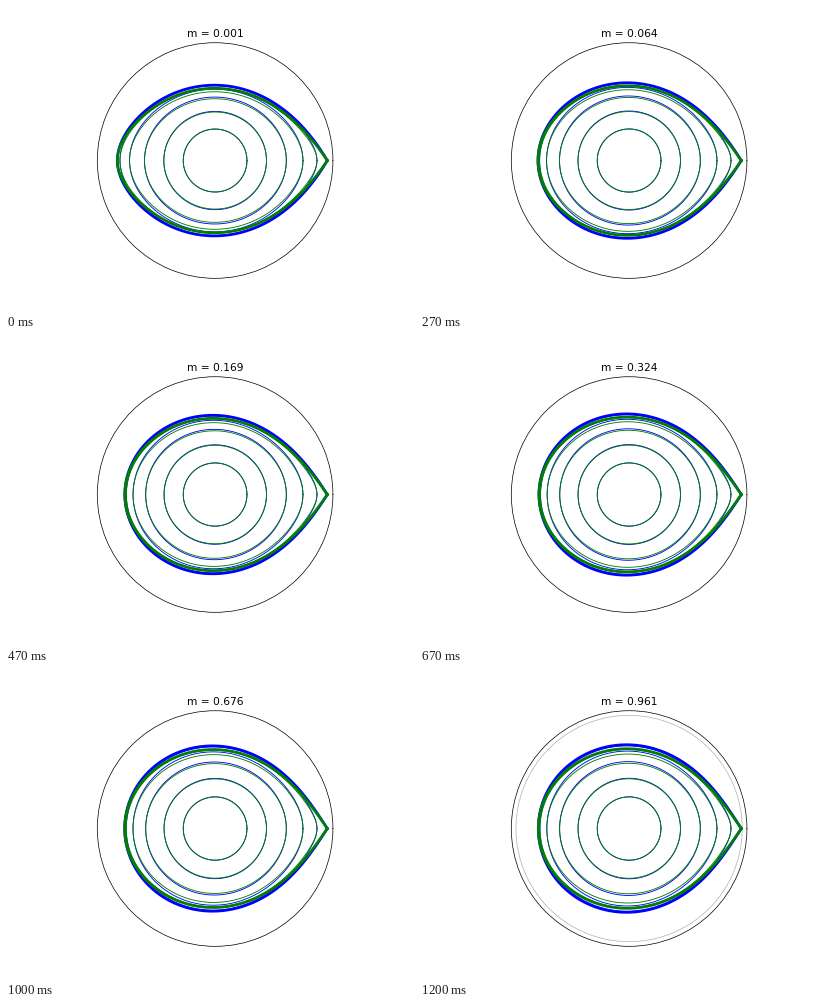
Recreate the animation shown at these times as a matplotlib script. Size 408 by 306 pixels, loop 1270 ms.

```python
import numpy as np
import matplotlib.pyplot as plt
from matplotlib.animation import FuncAnimation

DPI = 63.75
FRAMES, TICK = 127, 10
# Sub-stellar radius of each surface, in units of the L1 distance
LEVELS = np.array([0.284, 0.458, 0.635, 0.783, 0.908, 1.0])[:, None]
R_MAX = 1.05
THETA = np.linspace(0, 2 * np.pi, 481)


def bisect(below, lo, hi, steps=40):
    """Find where below() turns from true to false."""
    for _ in range(steps):
        mid = (lo + hi) / 2
        inside = below(mid)
        lo, hi = np.where(inside, mid, lo), np.where(inside, hi, mid)
    return (lo + hi) / 2


def l1_distance(q):
    def rising(r):
        return q / r**2 - 1 / (1 - r)**2 - (1 + q) * r + 1 > 0
    return float(bisect(rising, 0.0, 1.0))


def potential(r, theta, q, in_plane):
    """Roche potential around the star of mass q; its unit-mass companion is at x = 1."""
    x, side = r * np.cos(theta), r * np.sin(theta)
    spin = (x - 1 / (1 + q))**2 + (side**2 if in_plane else 0)
    return -q / r - 1 / np.sqrt((1 - x)**2 + side**2) - (1 + q) / 2 * spin


def surfaces(q, l1, in_plane):
    level = potential(LEVELS * l1, 0.0, q, True)

    def inside(r):
        return potential(r, THETA, q, in_plane) < level

    shape = (len(LEVELS), len(THETA))
    r = bisect(inside, np.zeros(shape), np.full(shape, l1))
    r[:, [0, -1]] = LEVELS * l1
    return r / l1


fig = plt.figure(figsize=(408 / DPI, 306 / DPI), dpi=DPI)
ax = fig.add_subplot(projection="polar")
ax.set_xticks([])
ax.set_yticks([])
ax.grid(False)
ax.set_ylim(0, R_MAX)

ring, = ax.plot(THETA, np.full_like(THETA, 2), color="#b0b0b0", lw=0.8)


def add_lines(color):
    widths = [1] * (len(LEVELS) - 1) + [3]
    return [ax.plot(THETA, THETA * 0, color=color, lw=w)[0] for w in widths]


equator = add_lines("blue")
meridian = add_lines("green")
title = ax.set_title("")
ax.set_ylim(0, R_MAX)


def update(tick):
    step = int((tick + 0.5) * 3 / 20)
    n = round(1 + 5 * step / 3)
    q = n * n / 1000
    l1 = l1_distance(q)
    for lines, in_plane in ((equator, True), (meridian, False)):
        for line, r in zip(lines, surfaces(q, l1, in_plane)):
            line.set_ydata(r)
    # Grid circle at half the separation
    half = 0.5 / l1
    ring.set_ydata(np.full_like(THETA, half))
    ring.set_visible(half < R_MAX)
    title.set_text(f"m = {q:.3f}")
    return [ring, *equator, *meridian, title]


anim = FuncAnimation(fig, update, frames=FRAMES, interval=TICK,
                     repeat=True, repeat_delay=0, blit=False)
plt.show()
```
